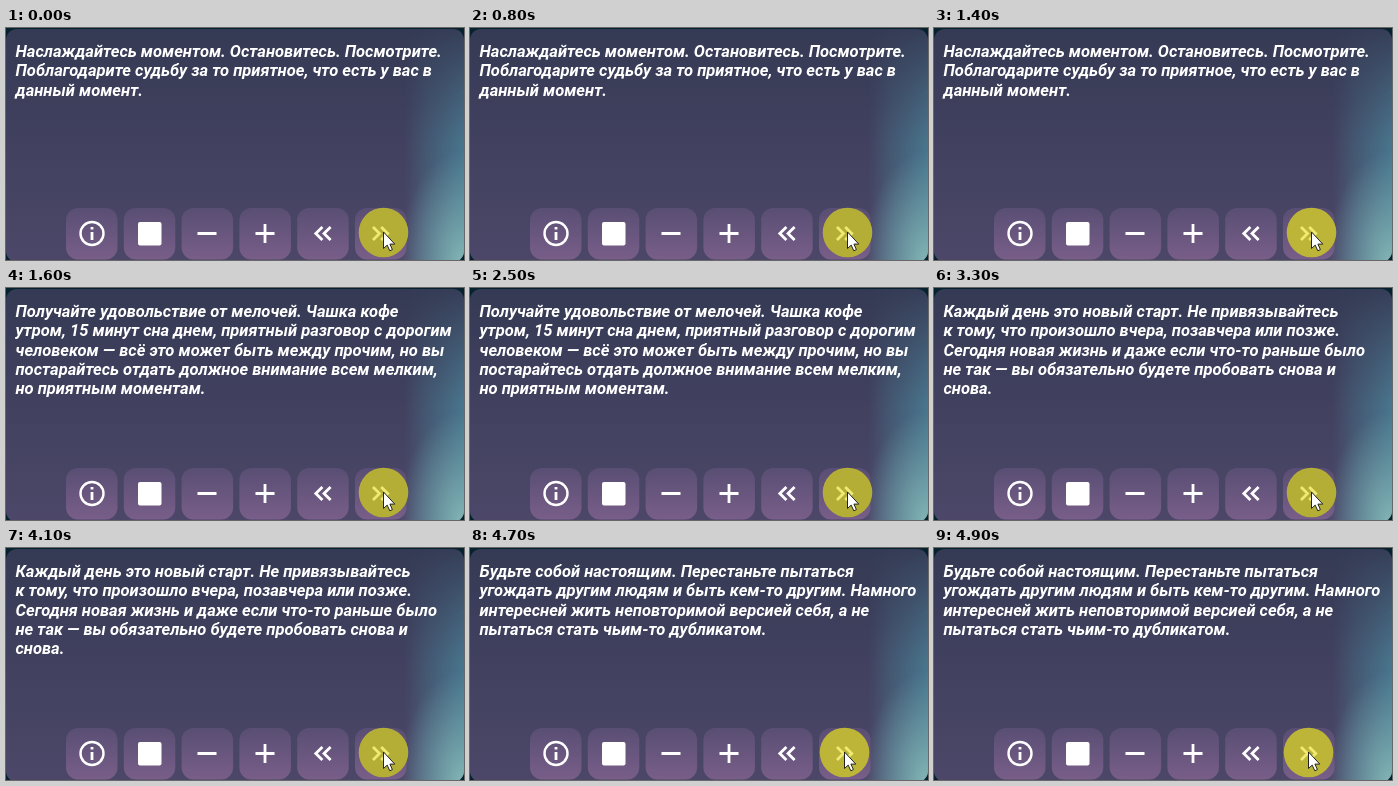
An HTML page for the animation above (5000 ms loop, 458 by 232 pixels).

```html
<!DOCTYPE html>
<html lang="ru">
<head>
<meta charset="utf-8">
<title>Советы дня</title>
<style>
html, body { margin: 0; width: 100%; height: 100%; overflow: hidden; background: #06222e; }
svg { display: block; width: 458px; height: 232px; }
.tips text { font: italic 700 16.55px Roboto, sans-serif; fill: #fff; white-space: pre; }
.tips g { opacity: 0; animation: 5s step-end infinite; }
.tips .a { animation-name: tip-a; }
.tips .b { animation-name: tip-b; }
.tips .c { animation-name: tip-c; }
.tips .d { animation-name: tip-d; }
@keyframes tip-a { 0% { opacity: 1; } 30%, 100% { opacity: 0; } }
@keyframes tip-b { 0% { opacity: 0; } 30% { opacity: 1; } 66%, 100% { opacity: 0; } }
@keyframes tip-c { 0% { opacity: 0; } 66% { opacity: 1; } 94%, 100% { opacity: 0; } }
@keyframes tip-d { 0% { opacity: 0; } 94%, 100% { opacity: 1; } }
.icon { fill: none; stroke: #fff; stroke-width: 2.8; }
.pointer { animation: drift 5s step-end infinite; }
.spot { fill: #b5ae36; animation: press 5s step-end infinite; }
@keyframes drift { 0% { transform: none; } 94%, 100% { transform: translateX(-3px); } }
@keyframes press {
  0% { fill: #b5ae36; } 24% { fill: #bdb538; } 30% { fill: #b5ae36; }
  56% { fill: #bdb538; } 66% { fill: #b5ae36; } 90%, 100% { fill: #bdb538; }
}
</style>
</head>
<body>
<svg viewBox="0 0 458 232">
  <defs>
    <linearGradient id="card" x2="0" y2="1">
      <stop stop-color="#353a54"/>
      <stop offset=".5" stop-color="#41415f"/>
      <stop offset="1" stop-color="#4c4768"/>
    </linearGradient>
    <linearGradient id="key" x2="0" y2="1">
      <stop stop-color="#594e73"/>
      <stop offset="1" stop-color="#785e89"/>
    </linearGradient>
    <linearGradient id="edge">
      <stop stop-color="#4a7f94" stop-opacity="0"/>
      <stop offset=".35" stop-color="#4a7f94" stop-opacity=".4"/>
      <stop offset="1" stop-color="#4a8398" stop-opacity=".95"/>
    </linearGradient>
    <radialGradient id="corner" gradientUnits="userSpaceOnUse" cx="0" cy="0" r="1"
      gradientTransform="translate(455 234) scale(62 110)">
      <stop stop-color="#8cbdb9" stop-opacity=".85"/>
      <stop offset="1" stop-color="#7cadb2" stop-opacity="0"/>
    </radialGradient>
    <linearGradient id="rise" x2="0" y2="1">
      <stop stop-color="#fff" stop-opacity=".05"/>
      <stop offset=".5" stop-color="#fff" stop-opacity=".85"/>
      <stop offset="1" stop-color="#fff"/>
    </linearGradient>
    <mask id="fade"><rect x="390" width="68" height="232" fill="url(#rise)"/></mask>
    <clipPath id="shape"><rect y="1" width="458" height="233" rx="11"/></clipPath>
    <rect id="btn" y="180" width="51.5" height="51.5" rx="12" fill="url(#key)"/>
    <path id="chevron" d="M6.6 -6.6 0 0 6.6 6.6"/>
  </defs>
  <rect width="458" height="232" fill="#06222e"/>
  <g clip-path="url(#shape)">
    <rect width="458" height="232" fill="url(#card)"/>
    <rect x="398" width="60" height="232" fill="url(#edge)" mask="url(#fade)"/>
    <rect x="390" width="68" height="232" fill="url(#corner)"/>
  </g>

  <g class="tips">
    <g class="a">
      <text x="9.5" y="29">Наслаждайтесь моментом. Остановитесь. Посмотрите.</text>
      <text x="9.5" y="48.3">Поблагодарите судьбу за то приятное, что есть у вас в</text>
      <text x="9.5" y="67.6">данный момент.</text>
    </g>
    <g class="b">
      <text x="9.5" y="29">Получайте удовольствие от мелочей. Чашка кофе</text>
      <text x="9.5" y="48.3">утром, 15 минут сна днем, приятный разговор с дорогим</text>
      <text x="9.5" y="67.6">человеком — всё это может быть между прочим, но вы</text>
      <text x="9.5" y="86.9">постарайтесь отдать должное внимание всем мелким,</text>
      <text x="9.5" y="106.2">но приятным моментам.</text>
    </g>
    <g class="c">
      <text x="9.5" y="29">Каждый день это новый старт. Не привязывайтесь</text>
      <text x="9.5" y="48.3">к тому, что произошло вчера, позавчера или позже.</text>
      <text x="9.5" y="67.6">Сегодня новая жизнь и даже если что-то раньше было</text>
      <text x="9.5" y="86.9">не так — вы обязательно будете пробовать снова и</text>
      <text x="9.5" y="106.2">снова.</text>
    </g>
    <g class="d">
      <text x="9.5" y="29">Будьте собой настоящим. Перестаньте пытаться</text>
      <text x="9.5" y="48.3">угождать другим людям и быть кем-то другим. Намного</text>
      <text x="9.5" y="67.6">интересней жить неповторимой версией себя, а не</text>
      <text x="9.5" y="86.9">пытаться стать чьим-то дубликатом.</text>
    </g>
  </g>

  <use href="#btn" x="60"/><use href="#btn" x="117.8"/><use href="#btn" x="175.6"/>
  <use href="#btn" x="233.4"/><use href="#btn" x="291.2"/><use href="#btn" x="349"/>

  <g class="icon">
    <circle cx="86" cy="205.5" r="11.5" stroke-width="2.4"/>
    <path d="M86 204V212M86 199V201.6"/>
    <rect x="132" y="194" width="23.5" height="23.5" rx="2" fill="#fff" stroke="none"/>
    <path d="M191.5 205.5H210.5M249.5 205.5H268.5M259 196V215"/>
    <use href="#chevron" x="309.8" y="205.5"/><use href="#chevron" x="318" y="205.5"/>
  </g>

  <g class="pointer"><circle class="spot" cx="377.5" cy="204.5" r="24.8"/></g>
  <g class="icon" style="stroke:#eeea72">
    <path d="M367 199 373.5 205.5 367 212M375.2 199 381.7 205.5 375.2 212"/>
  </g>
  <g class="pointer">
    <path d="M377.5 204V220.5L381.2 217.1 383.8 222.8 386.4 221.6 383.9 216.1H388.8Z"
      fill="#fff" stroke="#222" stroke-width="1"/>
  </g>
</svg>
</body>
</html>
```
